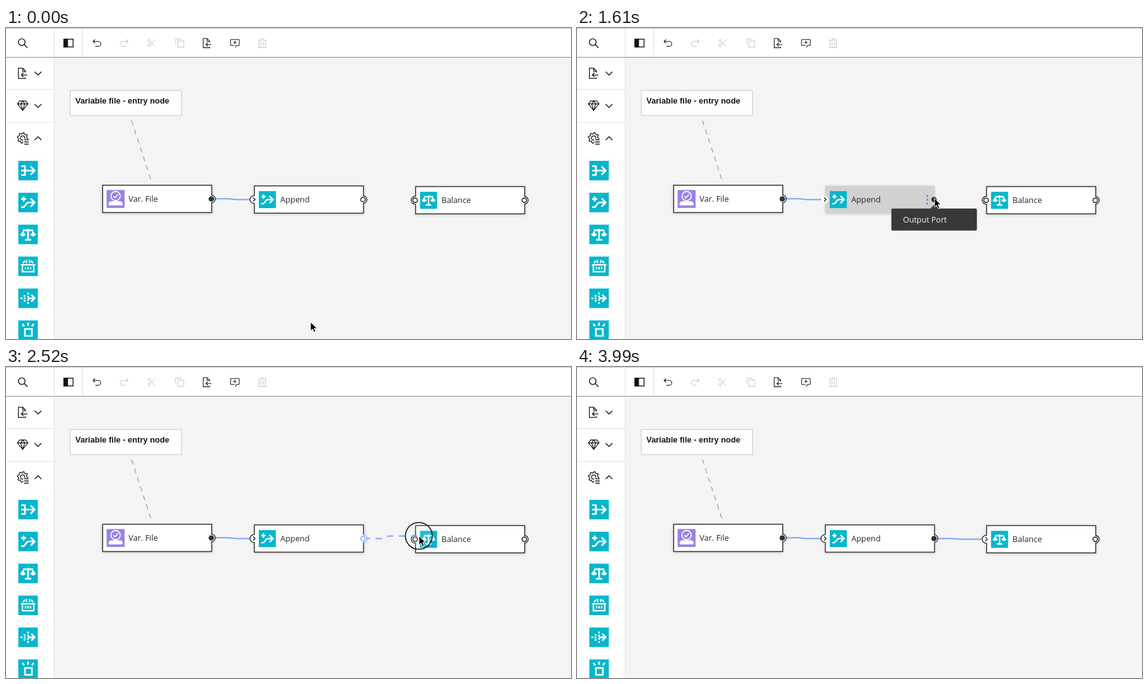
These frames come from a looping animation (896x494 px, 4.55 s). An HTML page:

```html
<!DOCTYPE html>
<html lang="en">
<head>
<meta charset="utf-8">
<title>Linking nodes</title>
<style>
  html, body { margin: 0; width: 100%; height: 100%; overflow: hidden; background: #f4f4f4; }
  svg { display: block; width: 100vw; height: 100vh; }
  text { font: 12.8px "Open Sans", "Noto Sans", sans-serif; fill: #262626; }
  .note { font: bold 12.9px "Liberation Sans", Arial, sans-serif; fill: #161616; }
  .icon { fill: none; stroke: #161616; stroke-width: 2; }
  .off { stroke: #c6c6c6; }
  .rule { fill: none; stroke: #e0e0e0; }
  .glyph { fill: none; stroke: #fff; stroke-width: 2.7; }
  .solid { fill: #fff; stroke: none; }
  .box { fill: #fff; stroke: #1c1c1c; stroke-width: 1.3; filter: drop-shadow(0 1px 2px #0003); }
  .link { fill: none; stroke: #78a4f4; stroke-width: 2; }
  .pad { fill: #fff; }
  .ring, .arrow, .eye { fill: none; stroke: #1c1c1c; stroke-width: 1.3; }
  .eye { fill: #fff; stroke-width: 1.5; }
  .dots { fill: #3f78e8; display: none; }
  .hot .box { fill: #d1d1d1; stroke: none; }
  .hot .ring, .hot .out .pad { display: none; }
  .hot .dots { display: inline; }
  .arrow, .joined .in .eye { display: none; }
  .joined .arrow { display: inline; }
  .full .out .eye { fill: #333; stroke: #333; }
  .pull .out .eye, .pull .out .ring { stroke: #78a4f4; }
  .tip { fill: #393939; }
  .tip text { fill: #f4f4f4; }
  .tip .head { font-weight: 600; }
</style>
</head>
<body>
<svg id="stage" viewBox="0 0 896 494" preserveAspectRatio="none"></svg>
<script>
const TEAL = '#06b6cb', PURPLE = '#9a82e6';
const stage = document.getElementById('stage');
const path = (d, cls) => `<path class="${cls}" d="${d}"/>`;

// Line icons on a 32-unit grid
const doc = 'M23 14V10L16 3H5V29H23V26M16 3V11H23M28 20H13M18 14.5L12.5 20L18 25.5';
const arc = 'M6 11H20a7 7 0 0 1 0 14H12M11 5.5L5.5 11L11 16.5';
const gear = () => {
  let d = '';
  for (let i = 0; i < 32; i++) {
    const a = (i + .5) * Math.PI / 16, r = i % 4 < 2 ? 13.5 : 10.3;
    d += `${i ? 'L' : 'M'}${(15 + r * Math.cos(a)).toFixed(1)} ${(15 + r * Math.sin(a)).toFixed(1)}`;
  }
  return d + 'Z';
};
const icon = (x, y, d, scale = .5625, cls = '', flip = 1) =>
  `<g transform="translate(${x} ${y}) scale(${scale * flip} ${scale}) translate(-16 -16)">${path(d, 'icon ' + cls)}</g>`;
const chevron = (y, up) => path(`M45.5 ${y + 2.5 * up}l5.3 ${-5.2 * up} 5.3 ${5.2 * up}`, 'icon" stroke-width="1.4" style="stroke-width:1.4');

// Tile glyphs, centred on zero
const glyphs = {
  merge: path('M-11-7h6V7h-6M-11 0H10M4-6.5L10.5 0L4 6.5', 'glyph'),
  append: path('M-7-9.5v8M-11-5.5h8M-11 7.5h3c4 0 4-7.5 9-7.5h9M4-6.5L10.5 0L4 6.5', 'glyph'),
  balance: path('M-8-6.5H8M0-9V9M-5 8.5H5', 'glyph') +
    path('M-12.5-1h9a4.5 4 0 0 1-9 0zM3.5-1h9a4.5 4 0 0 1-9 0zM-8-6l3 5h-6zM8-6l3 5h-6z', 'solid'),
  basket: path('M-11.5-2.5H11.5M-9-2V8.5H9V-2M-4 1v4M0 1v4M4 1v4M-8-5l3-4M-2.5-5v-5M2.5-5v-5M8-5l-3-4', 'glyph" style="stroke-width:2.3'),
  split: path('M-12 0h3M-7-4h3M-7 4h3M-7 0h3M0-9v3M0-4v3M0 1v3M0 6v3M0 0H10M5-5.5L10.5 0L5 5.5', 'glyph'),
  box: path('M-5-2H6V9H-5zM0-12v5M-9-10l3 4M9-10l-3 4', 'glyph'),
  file: '<circle class="glyph" cy="-5" r="8" style="stroke-width:1.8"/>' +
    path('M-4-5l3 3 5-6', 'glyph" style="stroke-width:1.8') + path('M-12 11V7l3-3H9l3 3v4z', 'solid')
};
const tile = (x, y, name, size = 31) => `<g transform="translate(${x} ${y}) scale(${size / 31})">
  <rect x="-15.5" y="-15.5" width="31" height="31" fill="${name === 'file' ? PURPLE : TEAL}"/>${glyphs[name]}</g>`;

const port = (x, y, side) => `<g class="${side < 0 ? 'in' : 'out'}" transform="translate(${x} ${y})">
  <circle class="pad" r="5.8"/>${path(`M0-6.2a6.2 6.2 0 0 ${side < 0 ? 0 : 1} 0 12.4`, 'ring')}
  <circle class="eye" r="3.6"/>${side < 0 ? path('M-1.3-3.2L2 0L-1.3 3.2', 'arrow') : ''}</g>`;

const node = (id, x, y, name, label, hasInput = true) => `<g id="${id}">
  <rect class="box" x="${x}" y="${y}" width="173" height="43.3"/>
  ${tile(x + 20.5, y + 21.8, name, name === 'file' ? 28.5 : 27)}
  <text x="${x + 41}" y="${y + 26}">${label}</text>
  <g class="dots">${[-6, 0, 6].map(d => `<circle cx="${x + 161.5}" cy="${y + 22 + d}" r="1.4"/>`).join('')}</g>
  ${hasInput ? port(x - .8, y + 21.7, -1) : ''}${port(x + 172.3, y + 21.7, 1)}</g>`;

const link = (x1, y1, x2, y2) => {
  const m = x1 + Math.min(30, (x2 - x1) / 2), w = Math.min(8, Math.abs(x2 - x1) / 4);
  return `M${x1} ${y1}H${m - w}C${m} ${y1} ${m} ${y2} ${m + w} ${y2}H${x2}`;
};

const tools = [
  icon(144, 24, arc), icon(187.5, 24, arc, .5625, 'off', -1),
  icon(231, 24, 'M28 5L11 20M28 27L11 12M12 8.5a4 4 0 1 1-8 0a4 4 0 1 1 8 0M12 23.5a4 4 0 1 1-8 0a4 4 0 1 1 8 0', .5, 'off'),
  icon(275.5, 24, 'M10 9H29V29H10zM4 20H3V3H21V5', .5, 'off'),
  icon(319, 24, doc),
  icon(363, 24, 'M15 23H5a2 2 0 0 1-2-2V7a2 2 0 0 1 2-2H27a2 2 0 0 1 2 2V21a2 2 0 0 1-2 2H20.5L17 29M16 9v10M11 14h10', .53),
  icon(406.5, 24, 'M12 12v12M20 12v12M4 7h24M6 7V29H26V7M12 3h8', .53, 'off')
].join('');

const shelf = ['merge', 'append', 'balance', 'basket', 'split', 'box']
  .map((name, i) => tile(35, 226.5 + i * 50.7, name)).join('');

stage.innerHTML = `
  <rect width="896" height="494" fill="#f4f4f4"/>
  <rect width="76" height="494" fill="#fff"/><rect width="896" height="46" fill="#fff"/>
  ${path('M76.5 0V494M121.5 0V46M0 97.5H76M0 150H76', 'rule')}
  <rect width="896" height="1.3" fill="#d4d4d4"/><rect y="46" width="896" height="1" fill="#8d8d8d"/>
  <g class="icon" style="stroke-width:1.4"><circle cx="25" cy="22.4" r="5.3"/><path d="M28.8 26.2l5.4 5.4"/>
    <rect x="92" y="17.7" width="14.4" height="12.4"/><path d="M92 18h5.6v12H92z" fill="#161616"/></g>
  ${tools}
  ${icon(26.5, 72, doc, .625)}
  ${icon(26.5, 123, 'M8 4H24L30 12L16 29L2 12zM2 12H30M10.5 12L16 29L21.5 12L16 4z', .6)}
  ${icon(27, 175.3, gear(), .625)}
  <circle cx="26.4" cy="174.7" r="3.4" class="icon" style="stroke-width:1.3"/>
  <rect x="27.5" y="176" width="10" height="11" fill="#fff"/>
  ${path('M29 177.5h7M29 181h7M29 184.5h7', 'icon" style="stroke-width:1.3')}
  ${chevron(72, -1)}${chevron(123.5, -1)}${chevron(175.5, 1)}
  ${shelf}
  <rect x="102" y="99.3" width="176.3" height="39.8" fill="#fff" stroke="#c6c6c6"/>
  <text class="note" x="110" y="120">Variable file - entry node</text>
  <path d="M199 147L230.3 242.5" fill="none" stroke="#999" stroke-width="1.2" stroke-dasharray="8 7"/>
  ${path(link(331, 271.3, 388, 272.5), 'link')}
  <path id="wire" class="link"/>
  ${node('source', 153.3, 249.8, 'file', 'Var. File', false)}
  ${node('append', 393.9, 250.8, 'append', 'Append')}
  ${node('balance', 649.6, 251.9, 'balance', 'Balance')}
  <path id="drag" class="link" stroke-dasharray="10 9" stroke-dashoffset="5"/>
  <g id="tipPort" class="tip"><path d="M560 287.5L567 280L574 287.5z"/>
    <rect x="498.5" y="286.7" width="135.7" height="35" rx="2"/>
    <text x="517" y="309" style="font-size:12.5px">Output Port</text></g>
  <g id="tipNode" class="tip"><path d="M729 306.5L736 299L743 306.5z"/>
    <rect x="673.4" y="306" width="125" height="56" rx="2"/>
    <text class="head" x="692" y="328.5">Balance</text><text x="692" y="348.3">Balance data</text></g>
  <circle id="press" r="21.3" fill="#fff" fill-opacity=".1" stroke="#111" stroke-width="1.5"/>
  <path id="cursor" d="M0 0V14.2L3.3 11.2L5.6 16.3L8 15.2L5.8 10.2H10.2z" stroke="#fff" stroke-width="1"/>`;

const LOOP = 4550, STEP = 70;
const el = id => document.getElementById(id);
const [append, balance, wire, drag, tipPort, tipNode, press, cursor] =
  ['append', 'balance', 'wire', 'drag', 'tipPort', 'tipNode', 'press', 'cursor'].map(el);

el('source').setAttribute('class', 'full');
wire.setAttribute('d', link(572, 272.5, 644, 273.6));

// time, x, y of the pointer tip
const moves = [
  [0, 483, 467], [210, 497, 440], [420, 521, 387], [490, 521, 387], [560, 552, 360], [630, 552, 360],
  [840, 564, 325], [1050, 573, 290.5], [1190, 572, 284], [1260, 569, 275], [1400, 567, 270.5],
  [2030, 567, 270.5], [2100, 579, 297], [2170, 604, 314], [2240, 635, 301], [2310, 655, 279],
  [2380, 656, 270], [2520, 655, 268.5], [2940, 655, 268.5], [3010, 655, 272],
  [3640, 654, 272], [3710, 653, 305], [3850, 648, 410], [3990, 642, 500], [LOOP, 642, 500]
];
const pointer = t => {
  const i = Math.max(1, moves.findIndex(m => m[0] > t));
  const [t0, x0, y0] = moves[i - 1], [t1, x1, y1] = moves[i], k = (t - t0) / (t1 - t0);
  return [x0 + (x1 - x0) * k, y0 + (y1 - y0) * k];
};
const clamp = v => Math.max(0, Math.min(1, v));
const fade = (t, a, b, c, d) => Math.min(clamp((t - a) / (b - a)), clamp((d - t) / (d - c)));
const during = (t, a, b) => t >= a && t < b;
const show = (node, on) => node.style.display = on ? '' : 'none';

function draw(t) {
  const [x, y] = pointer(t);
  const overAppend = during(t, 1260, 2100), dragging = during(t, 2100, 2940), linked = t >= 2940;
  cursor.setAttribute('transform', `translate(${x} ${y})`);
  press.setAttribute('transform', `translate(${x - .3} ${y - .2})`);
  show(press, during(t, 1890, 2940));
  show(drag, dragging);
  show(wire, linked);
  if (dragging) drag.setAttribute('d', link(572, 272.5, x - 2, y));
  append.setAttribute('class', 'joined' + (overAppend ? ' hot full' : t >= 2870 ? ' full' : dragging ? ' pull' : ''));
  balance.setAttribute('class', (linked ? 'joined' : '') + (during(t, 3150, 3710) ? ' hot' : ''));
  tipPort.style.opacity = fade(t, 1400, 1610, 1750, 1960);
  tipNode.style.opacity = fade(t, 3150, 3360, 3570, 3780);
}

const start = performance.now();
function tick() {
  const t = (performance.now() - start) % LOOP;
  draw(Math.floor(t / STEP) * STEP);
  requestAnimationFrame(tick);
}
tick();
</script>
</body>
</html>
```
